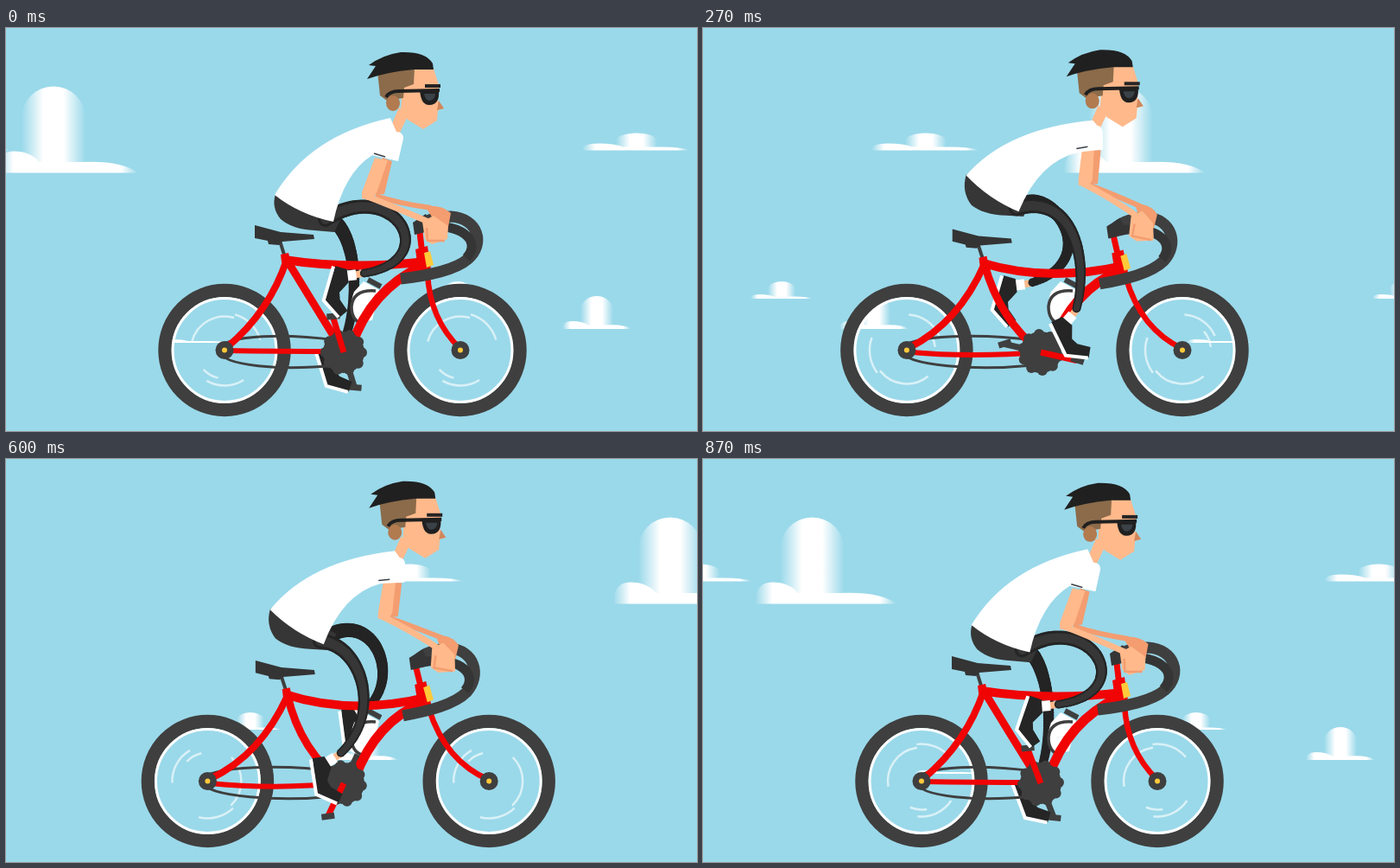
These frames come from a looping animation (800 by 466 pixels, 0.9 s). An HTML page with a canvas:

```html
<!DOCTYPE html>
<html lang="en">
<head>
<meta charset="utf-8">
<title>Cyclist</title>
<style>
html, body { margin: 0; width: 800px; height: 466px; overflow: hidden; background: #9ad9ea; }
canvas { display: block; }
</style>
</head>
<body>
<canvas id="stage" width="800" height="466"></canvas>
<script>
const ctx = document.getElementById('stage').getContext('2d');
const LOOP = 900, STEP = 30, TAU = Math.PI * 2;
const DARK = '#3f3f3f', RED = '#f00404', YELLOW = '#ffc93a', SKIN = '#ffb98b', SHADE = '#f39d70';
const CRANK = { x: 391, y: 375, length: 43 };

// Leg poses every 90 ms: two curve handles (x, y), ankle (x, y), foot angle.
const LEG = [
  [450, 170, 509, 270, 412, 284, 106],
  [450, 168, 504, 264, 420, 284, 96],
  [443, 176, 476, 258, 436, 298, 76],
  [428, 190, 448, 268, 432, 326, 64],
  [405, 215, 435, 300, 402, 350, 63],
  [420, 224, 444, 304, 403, 354, 73],
  [420, 222, 444, 302, 397, 350, 79],
  [410, 208, 440, 290, 383, 334, 84],
  [425, 180, 495, 278, 391, 299, 106],
  [440, 172, 509, 274, 402, 286, 112]
];

const mix = (a, b, k) => a + (b - a) * k;
const easeCubic = u => u < .5 ? 4 * u ** 3 : 1 - 4 * (1 - u) ** 3;

// Blends two path strings that have the same commands.
function morph(a, b = a, k = 0) {
  const target = b.match(/-?[\d.]+/g);
  let i = 0;
  return new Path2D(a.replace(/-?[\d.]+/g, n => mix(+n, +target[i++], k).toFixed(2)));
}
function fill(color, ...shape) {
  ctx.fillStyle = color;
  ctx.fill(morph(...shape));
}
function line(color, width, ...shape) {
  ctx.strokeStyle = color;
  ctx.lineWidth = width;
  ctx.stroke(morph(...shape));
}
function disc(color, x, y, rx, ry = rx) {
  ctx.fillStyle = color;
  ctx.beginPath();
  ctx.ellipse(x, y, rx, ry, 0, 0, TAU);
  ctx.fill();
}
function ring(color, width, x, y, r, from = 0, to = TAU) {
  ctx.strokeStyle = color;
  ctx.lineWidth = width;
  ctx.beginPath();
  ctx.arc(x, y, r, from, to);
  ctx.stroke();
}
function at(x, y, angle, draw) {
  ctx.save();
  ctx.translate(x, y);
  ctx.rotate(angle);
  draw();
  ctx.restore();
}

// White that fades out at both ends, like motion blur.
function haze(left, right, soft) {
  const g = ctx.createLinearGradient(left, 0, right, 0);
  g.addColorStop(0, '#fff0');
  g.addColorStop(soft, '#fff');
  g.addColorStop(1 - soft, '#fff');
  g.addColorStop(1, '#fff0');
  return g;
}
function cloud(base, left, right, hump, top, low) {
  if (hump) {
    ctx.fillStyle = haze(-hump, hump, .34);
    ctx.beginPath();
    ctx.roundRect(-hump, -top, hump * 2, top - 1, [hump, hump, hump * .4, hump * .4]
      .map(x => ({ x, y: Math.min(x, top * .45) })));
    ctx.fill();
  }
  fill(haze(left, right, .12), `M${left} 0 Q${left} ${-low} ${left * .7} ${-low}
    Q${left * .4} ${-low} ${left * .25} ${-low * .5} L${right * .3} ${-low * .5}
    Q${right * .8} ${-low * .6} ${right} 0Z`);
}
// A row of equal clouds that moves two spans per loop.
function cloudRow(t, start, span, base, ...shape) {
  const offset = (start - 2 * span * t / LOOP) % span;
  for (let x = offset - span; x < 950; x += span) {
    at(x, base, 0, () => cloud(base, ...shape));
  }
}
function clouds(t) {
  cloudRow(t, 55, 1071, 167.5, -66, 98, 37, 100, 25);
  cloudRow(t, 730, 787, 141.5, -63, 62, 24, 20, 8);
  cloudRow(t, 684, 810, 348, -40, 40, 19, 38, 9);
  cloudRow(t, 523, 720, 313, -36, 36, 16, 20, 5);
  cloudRow(t, 220, 945, 364, -38, 38, 0, 0, 4);
}

function wheel(x, t) {
  const y = 372.5, spin = TAU * t / LOOP * 2;
  ring(DARK, 15.5, x, y, 69);
  ring('#fff', 3, x, y, 60);
  [[39, 3.4, 1.6], [41, 1, 1.1], [43, 5, 1], [33, 1.8, .6]].forEach(([r, a, len]) =>
    ring('#ffffffa0', 2.5, x, y, r, a + spin, a + spin + len));
}
function hub(x) {
  disc(DARK, x, 372.5, 10.5);
  disc(YELLOW, x, 372.5, 3);
}

function crank(angle, color) {
  const x = CRANK.x + CRANK.length * Math.cos(angle);
  const y = CRANK.y + CRANK.length * Math.sin(angle);
  line(color, 7, `M${CRANK.x} ${CRANK.y}L${x} ${y}`);
  at(x, y, .3 * Math.cos(angle), () => fill(DARK, 'M-7 -4H8V3H-7Z'));
}
function chainring(angle) {
  disc(DARK, CRANK.x, CRANK.y, 24);
  for (let i = 0; i < 10; i++) {
    const a = angle + i * TAU / 10;
    disc(DARK, CRANK.x + 21 * Math.cos(a), CRANK.y + 21 * Math.sin(a), 6);
  }
}

function legPose(t) {
  const u = t / 90, i = Math.floor(u), f = u - i;
  const [p, a, b, n] = [-1, 0, 1, 2].map(d => LEG[(i + d + 10) % 10]);
  return a.map((v, j) => v + f / 2 * (b[j] - p[j] +
    f * (2 * p[j] - 5 * v + 4 * b[j] - n[j] + f * (3 * (v - b[j]) + n[j] - p[j]))));
}
function leg(t, bob, far) {
  let [x1, y1, x2, y2, ax, ay, angle] = legPose(t % LOOP);
  if (far) {
    x1 -= 24; y1 -= 6;
    x2 -= 27; y2 -= 10;
    ax -= 12; ay += (ay - 315) * .25;
  }
  const hx = 370 - 8 * bob, hy = 221 - 14 * bob;
  at(ax, ay, angle * Math.PI / 180, () => {
    line(SKIN, 8, 'M0 0L4 8');
    line('#fff', 12, 'M3 6L9 20');
    fill('#252525', 'M0 32L0 18L14 12L28 19L36 16L46 4L56 11L42 33Z');
    line('#fff', 4, 'M1 34L42 34L56 12');
  });
  const tones = far ? [['#242424', 1]] : [['#252525', 1], ['#373737', .65]];
  for (const [color, scale] of tones) {
    for (let u = 0; u <= 1; u += .015) {
      const v = 1 - u, w = [v ** 3, 3 * v * v * u, 3 * v * u * u, u ** 3];
      disc(color, w[0] * hx + w[1] * x1 + w[2] * x2 + w[3] * ax,
        w[0] * hy + w[1] * y1 + w[2] * y2 + w[3] * ay, mix(9, 5, u) * scale);
    }
  }
}

function frame(k, rear, front) {
  line(DARK, 3, `M382 361C330 354 ${rear + 2} 353 ${rear - 8} 372C${rear - 3} 392 320 396 382 390`);
  fill('#fff', 'M403 305L414 293L432 303L424 338L405 340Q396 322 403 305Z');
  line(DARK, 3.5, 'M428 304Q402 302 400 322Q400 338 412 342');
  line(DARK, 6, 'M419 291L434 299');
  line(RED, 6, `M${rear} 373Q315 374 391 374`, `M${rear} 375Q310 384 391 375`, k);
  line(RED, 8, `M325 268Q305 328 ${rear + 3} 369`, `M326 275Q293 345 ${rear + 3} 370`, k);
  line(RED, 9, 'M325 268Q358 322 391 375', 'M326 274Q338 342 391 375', k);
  line(RED, 10, 'M322 268Q400 280 486 270', 'M324 273Q400 300 490 276', k);
  line(RED, 11, 'M482 275Q422 303 400 368', 'M484 282Q430 303 405 368', k);
  line(RED, 6.5, `M488 283Q490 336 ${front} 371`, `M490 290Q512 352 ${front} 371`, k);
  line(DARK, 4, 'M317 246L322 262', 'M319 252L324 267', k);
  fill(RED, 'M318 262L327 260L331 276L320 278Z', 'M320 267L329 265L332 281L322 283Z', k);
  fill('#343434', 'M288 228L318 236L356 239L357 244L320 247L316 251L304 250L303 246L288 243Z',
    'M289 234L319 242L357 245L358 250L321 253L317 256L305 255L304 252L289 248Z', k);
}
function handlebar(k) {
  line(RED, 7, 'M479 236L482 262', 'M474 242L481 268', k);
  fill(RED, 'M474 256L488 252L493 286L478 286Z', 'M473 262L486 258L494 292L478 291Z', k);
  fill(YELLOW, 'M484 260L491 258L495 274L487 277Z', 'M483 265L490 262L495 279L488 282Z', k);
  line(DARK, 13, 'M479 230Q488 218 515 218C547 220 555 250 535 267C520 280 490 286 457 290',
    'M473 237Q482 222 512 219C542 221 550 250 533 270C518 285 490 292 460 298', k);
  line('#353535', 11, 'M480 230C525 224 552 245 533 266', 'M475 237C520 226 548 247 531 268', k);
  fill('#353535', 'M471 225L486 215L494 234L473 239Z', 'M466 231L482 221L490 240L468 245Z', k);
}

function arm(bob, far) {
  if (far) {
    fill(SHADE, 'M436 150L447 154L438 192L426 193Z', 'M450 140L462 140L459 179L446 179Z', bob);
    line(SHADE, 6, 'M428 194Q455 203 492 208', 'M448 180Q475 190 508 206', bob);
    fill(SHADE, 'M485 206Q505 204 515 214L512 230L498 226Z', 'M501 202Q522 204 527 216L523 232L508 224Z', bob);
  } else {
    fill(SKIN, 'M427 150L442 153L430 188L424 200L412 197L412 190Z',
      'M440 140L454 140L453 174L448 184L437 180L437 174Z', bob);
    line(SKIN, 7, 'M416 194Q450 207 489 224', 'M442 178Q475 195 507 219', bob);
    fill(SKIN, 'M482 224L495 217L512 229L511 244L493 250L485 244Z',
      'M497 217L510 211L522 225L523 246L503 246L494 240Z', bob);
    line(SHADE, 2.5, 'M487 231L488 246L508 246', 'M501 226L498 240L520 245', bob);
  }
}

function head(bob) {
  at(3 * bob, -3 * bob, 0, () => {
    fill(SKIN, 'M455 92L466 100L455 123L445 115Z');
    fill(SKIN, 'M470 47L495 47L501 66L500 84L507 93L500 95L499 107L483 117L465 106L457 96L459 68Z');
    fill('#8b6b4a', 'M430 50L473 46L472 65L461 69L460 81L441 84L433 78Z');
    disc('#b27a4f', 448, 87, 8, 9);
    fill('#cf875d', 'M501 84L507 93L499 95Z');
    fill('#202020', 'M418 59L428 44L420 43Q436 31 457 28Q486 27 494 41L495 48L472 48Q440 51 418 59Z');
    line('#252525', 4, 'M485 67L503 67');
    line('#202020', 4, 'M440 80Q444 73 455 73L502 72');
    fill('#202020', 'M479 72L501 72C502 82 499 89 490 89C482 89 480 81 479 72Z');
    fill('#3a4248', 'M484 76H497Q497 83 490 84Q485 83 484 76Z');
  });
}
function pants(bob) {
  fill('#363636', 'M312 192Q307 208 318 221Q332 233 357 234L380 236L390 216L372 205Z',
    'M304 167Q298 187 310 203Q324 214 350 215L370 216L380 198L365 190Z', bob);
}
function shirt(bob) {
  fill('#fff', `M311 193Q352 124 445 104L452 120Q460 120 460 128L454 154L424 147
    Q391 168 379 224Q340 216 311 193Z`, `M304 168Q352 115 452 107L457 112Q462 113 463 119L464 139L437 143
    Q389 152 364 211Q330 196 304 168Z`, bob);
  line('#3a4048', 1.5, 'M426 145L439 149', 'M433 139L446 136', bob);
}

function draw(t) {
  const k = easeCubic(1 - Math.abs(1 - t / 450));
  const bob = (1 - Math.cos(2 * TAU * t / LOOP)) / 2;
  const angle = (-107 + .4 * t - 20 * Math.sin(2 * TAU * t / LOOP)) * Math.PI / 180;
  const rear = mix(253, 230, k), front = mix(526, 565, k);
  ctx.fillStyle = '#9ad9ea';
  ctx.fillRect(0, 0, 800, 466);
  clouds(t);
  wheel(rear, t);
  wheel(front, t);
  crank(angle + Math.PI, DARK);
  leg(t + LOOP / 2, bob, true);
  frame(k, rear, front);
  hub(rear);
  hub(front);
  chainring(angle);
  crank(angle, RED);
  handlebar(k);
  pants(bob);
  leg(t, bob, false);
  arm(bob, true);
  arm(bob, false);
  head(bob);
  shirt(bob);
}

function tick(now) {
  draw(Math.floor(now % LOOP / STEP) * STEP);
  requestAnimationFrame(tick);
}
draw(0);
requestAnimationFrame(tick);
</script>
</body>
</html>
```
